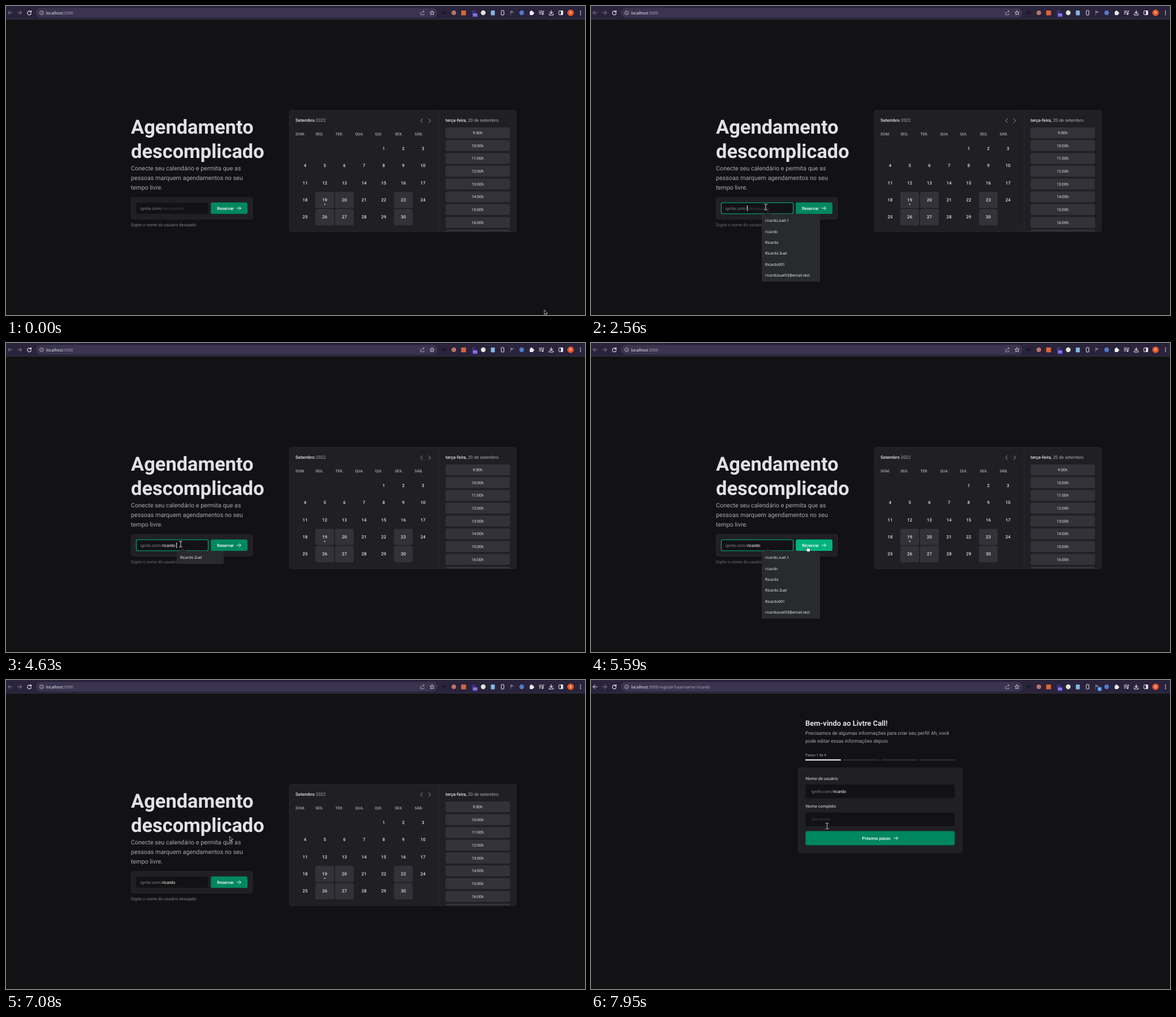
An HTML page for the animation above (8 s loop, 1024 by 547 pixels).

```html
<!DOCTYPE html>
<html lang="pt-BR">
<head>
<meta charset="utf-8">
<title>Agendamento</title>
<style>
html, body { margin: 0; width: 100%; height: 100%; overflow: hidden; background: #121214; }
svg { display: block; width: 1024px; height: 547px; }
text { font-family: Roboto, sans-serif; white-space: pre; text-rendering: geometricPrecision; }
.ui { font-family: "Open Sans", sans-serif; }
.line { fill: none; stroke-linecap: round; stroke-linejoin: round; }
</style>
</head>
<body>
<svg id="stage" viewBox="0 0 1024 547" xmlns="http://www.w3.org/2000/svg"></svg>
<script>
const LOOP = 8000, NAV = 7400;
const USER = 'ricardo';
const NAMES = ['ricardo.zuel.1', USER, 'Ricardo', 'Ricardo Zuel', 'Ricardo001', 'ricardozuel53@email.test'];
const C = { bg: '#121214', card: '#202024', edge: '#323238', dim: '#7c7c8a', soft: '#a9a9b2',
  text: '#e1e1e6', white: '#fff', green: '#00875f', bright: '#00b37e', hint: '#404049' };
const SIZE = { xs: 6.45, sm: 7.525, md: 8.6, xl: 10.75, h2: 12.9, h1: 34.4 };

const rect = (x, y, w, h, fill, r = 0, extra = '') =>
  `<rect x="${x}" y="${y}" width="${w}" height="${h}" rx="${r}" fill="${fill}" ${extra}/>`;
const text = (x, y, size, fill, str, extra = '') =>
  `<text x="${x}" y="${y}" font-size="${size}" fill="${fill}" ${extra}>${str}</text>`;
const line = (d, color, w = 1, extra = '') =>
  `<path class="line" d="${d}" stroke="${color}" stroke-width="${w}" ${extra}/>`;
const dot = (x, y, r, fill) => `<circle cx="${x}" cy="${y}" r="${r}" fill="${fill}"/>`;
const group = (id, body) => `<g id="${id}">${body}</g>`;
const card = (x, y, w, h) => rect(x, y, w, h, C.card, 3.5, `stroke="${C.edge}" stroke-width=".6"`);
const arrow = (x, y) => line(`M${x} ${y}h7M${x + 4.2} ${y - 2.9}l2.9 2.9l-2.9 2.9`, C.white, .9);
const MED = 'font-weight="500"', BOLD = 'font-weight="700"', MID = 'text-anchor="middle"';

function toolbar() {
  const w = '#f0eef6', g = '#8b869d';
  return rect(0, 0, 1024, 23, '#29233b') + rect(131, 0, 893, .6, '#191527') + rect(0, 23, 1024, .6, '#4a4459') +
    rect(53, 3.5, 710, 17, '#3a3450', 8.5) +
    line('M10.8 12H3.8M7 8.6L3.6 12L7 15.4', g, 1, 'id="back"') +
    line('M20.5 12h7M24.3 8.6l3.4 3.4l-3.4 3.4', g) +
    line('M43.9 10.2A3.4 3.4 0 1 0 44.6 12.8M44.6 8.2v2.6h-2.6', w, 1.1) +
    line('M66.4 12a3.4 3.4 0 1 1 -6.8 0a3.4 3.4 0 1 1 6.8 0M63 11.8v1.8M63 10.2v.1', '#cbc7d8', .8) +
    `<text id="url" class="ui" x="71" y="14.5" font-size="7.1" fill="${C.white}">localhost<tspan fill="#b3aec3"></tspan></text>` +
    line('M733 11.2v4.4h6.2v-2.2M735 13c.2-2.6 1.8-3.6 4.6-3.6M737.8 7.8l2 1.6l-2 1.7', '#b5b0c4', .8) +
    line('M753.5 8.3l1.1 2.5l2.7 .3l-2 1.8l.6 2.7l-2.4-1.4l-2.4 1.4l.6-2.7l-2-1.8l2.7-.3z', w, .8) +
    rect(770.5, 9.5, 7, 4.5, '#1d182c', 1) +
    dot(792, 12, 4, '#b7746a') +
    rect(805, 8, 8.5, 8.5, '#d8643c') +
    dot(827, 10.5, 3.6, '#3c2d70') + rect(825, 12.6, 9, 6.8, '#5b46c8', 1) +
    text(829.5, 18, 5.6, C.white, '11', MID + ' ' + BOLD) +
    dot(844, 12, 4.2, '#dfe5d8') +
    rect(857.5, 8, 7, 8.5, '#82b8e6', 1) +
    rect(876, 8, 4.6, 8, 'none', .8, `stroke="${w}" stroke-width="1"`) +
    `<path d="M892 8l7 2.4l-6.2 2.4v3.6h-.8z" fill="#77738a"/>` +
    group('badge', rect(896, 12.6, 7, 6.8, '#4c8fe0', 1) + text(899.5, 18, 5.6, C.white, '1', MID + ' ' + BOLD)) +
    dot(912, 12, 4.2, '#5079c8') +
    rect(926.3, 9.6, 6.2, 6.3, w, .8) + dot(929.3, 9.3, 1.4, w) + dot(932.8, 12.6, 1.4, w) +
    line('M943 9h5.5M943 11.5h5.5M943 14h3M950 14V9h1.6', w) + dot(949, 14.4, 1.3, w) +
    line('M964.3 8v5M961.8 10.8l2.5 2.5l2.5-2.5M960.8 13.8v2.2h7v-2.2', w, 1.1) +
    rect(977.8, 8.5, 7, 7, 'none', .8, `stroke="${w}" stroke-width="1"`) + rect(981.5, 8.5, 3.3, 7, w) +
    dot(998.5, 12, 5.8, '#e5562b') + text(998.5, 14.3, 6.2, C.white, 'R', MID) +
    dot(1016, 8.8, .9, w) + dot(1016, 12, .9, w) + dot(1016, 15.2, .9, w);
}

function calendar() {
  const col = i => 529 + i * 34.75, row = i => 251.8 + i * 30.45;
  const open = [19, 20, 23, 26, 27, 30];
  let s = card(501, 184.8, 401.5, 214.7) + line('M766 185v214', C.edge, .6);
  s += text(512, 205.4, 7.8, C.text, `Setembro <tspan font-weight="400" fill="${C.soft}">2022</tspan>`, MED);
  s += line('M736.6 199.6l-3.4 3.3l3.4 3.3M747.6 199.6l3.4 3.3l-3.4 3.3', C.soft, .9);
  ['DOM.', 'SEG.', 'TER.', 'QUA.', 'QUI.', 'SEX.', 'SÁB.'].forEach((d, i) => {
    s += text(512.2 + i * 35.1, 229, 6.7, C.soft, d, MED);
  });
  for (let d = 1; d <= 30; d++) {
    const x = col((d + 3) % 7), y = row(Math.floor((d + 3) / 7));
    if (open.includes(d)) s += rect(x - 16.6, y - 14.2, 33, 28.8, C.edge, 3);
    s += text(x, y + 2.8, 7.75, C.text, d, MED + ' ' + MID);
  }
  s += dot(col(1), 351, 1.1, C.text);
  s += text(777.3, 205.4, 7.8, C.text, `terça-feira, <tspan font-weight="400" fill="${C.soft}">20 de setembro</tspan>`, MED);
  for (let i = 0; i < 8; i++) {
    const y = 224.5 + i * 22.65;
    s += rect(777.3, y - 9.6, 114, 19.2, C.edge, 3) + text(834.2, y + 2.5, 6.95, C.text, `${9 + i}:00h`, MID);
  }
  return s + `<path d="M777.3 399V398.6a3 3 0 0 1 3-2.6h108a3 3 0 0 1 3 2.6V399z" fill="${C.edge}"/>`;
}

function home() {
  let s = text(221, 226.1, SIZE.h1, C.text, 'Agendamento', BOLD) + text(221, 269.1, SIZE.h1, C.text, 'descomplicado', BOLD);
  ['Conecte seu calendário e permita que as', 'pessoas marquem agendamentos no seu', 'tempo livre.']
    .forEach((str, i) => s += text(221, 290.8 + i * 17.2, SIZE.xl, C.soft, str));
  s += card(221.3, 338.9, 214.8, 38.3);
  s += rect(230.4, 348.2, 127.2, 19.6, C.bg, 2.6, 'id="field" stroke-width="1.1"');
  s += text(237.7, 360.6, SIZE.sm, C.dim, 'ignite.com/');
  s += text(276, 360.6, SIZE.sm, C.hint, 'seu-usuário', 'id="hint"') + text(276, 360.6, SIZE.sm, C.white, '', 'id="typed"');
  s += rect(276, 353, .9, 10, C.white, 0, 'id="caret"');
  s += rect(362.3, 347.8, 64.7, 20.3, C.green, 2.6, 'id="button"');
  s += text(373.2, 360.7, SIZE.sm, C.white, 'Reservar', MED) + arrow(408.3, 358);
  s += text(221, 389.7, SIZE.sm, C.dim, 'Digite o nome do usuário desejado', 'id="help"');
  s += calendar();
  const menu = (id, names, w, h) => group(id, rect(302, 368, w, h, '#292a2d', 1.5) +
    `<path d="M307.5 368.2l5.2-4.6l5.2 4.6z" fill="#292a2d"/>` +
    names.map((n, i) => text(308, 382.3 + i * 19.35, 6.7, C.white, n, 'class="ui"')).join(''));
  return s + menu('full', NAMES, 103, 120) + menu('single', [NAMES[3]], 83, 23);
}

function register() {
  let s = text(379, 81.2, SIZE.h2, C.text, 'Bem-vindo ao Livtre Call!', BOLD);
  s += text(379, 97, SIZE.md, C.soft, 'Precisamos de algumas informações para criar seu perfil! Ah, você');
  s += text(379, 110.8, SIZE.md, C.soft, 'pode editar essas informações depois.');
  s += text(379, 135.3, SIZE.xs, C.soft, 'Passo 1 de 4');
  for (let i = 0; i < 4; i++) s += rect(379 + i * 67.2, 140.5, 63, 2.1, i ? C.edge : C.white, .5);
  s += card(366.5, 155.8, 290, 149.7);
  s += text(379.7, 177, SIZE.sm, C.text, 'Nome de usuário') + rect(379.5, 185, 263.7, 24.5, C.bg, 3);
  s += text(389.5, 199.8, SIZE.sm, C.dim, `ignite.com/<tspan fill="${C.white}">${USER}</tspan>`);
  s += text(379.7, 226.2, SIZE.sm, C.text, 'Nome completo') + rect(379.5, 234.5, 263.7, 24.5, C.bg, 3);
  s += text(389.5, 249.2, SIZE.sm, C.hint, 'Seu nome');
  s += rect(379.5, 267.5, 263.7, 25, C.green, 3) + text(479.6, 282.5, SIZE.sm, C.white, 'Próximo passo', MED);
  return s + arrow(535.6, 280);
}

function pointers() {
  const beam = 'M-2.6-5h1.6q1 0 1 1v8q0 1-1 1h-1.6M2.6-5h-1.6q-1 0-1 1M2.6 5h-1.6q-1 0-1-1';
  return group('mouse',
    group('arrow', `<path d="M0 0V8.1L1.9 6.4L3.2 9.3L4.4 8.8L3.2 6H5.7z" fill="#0c0c0e" stroke="#e8e8e8" stroke-width=".7"/>`) +
    group('beam', line(beam, '#0c0c0e', 2) + line(beam, '#d8d8d8', 1)) +
    group('hand', `<path d="M-.9 .6a.9 .9 0 0 1 1.8 0V4.2l3.2 .8q1 .3 .9 1.4l-.6 2.6q-.2 1.4-1.4 1.4H0q-.8 0-1.3-.8L-3.3 6.6q-.4-1 .6-1.1l1.8 1.1z" fill="#fff" stroke="#0c0c0e" stroke-width=".6"/>`));
}

const stage = document.getElementById('stage');
stage.innerHTML = toolbar() + group('home', home()) + group('register', register()) + pointers();
const el = {};
stage.querySelectorAll('[id]').forEach(n => el[n.id] = n);

// time, x, y, pointer shape from then on
const path = [
  [0, 952, 538, 'arrow'], [200, 800, 500, 'arrow'], [330, 610, 452, 'arrow'], [460, 488, 427, 'arrow'],
  [535, 488, 427, 'arrow'], [600, 494, 434, 'arrow'], [800, 420, 392, 'arrow'], [1000, 290, 338, 'arrow'],
  [1070, 280, 334, 'arrow'], [1200, 292, 349, 'beam'], [1330, 309, 356, 'beam'],
  [5170, 309, 356, 'beam'], [5330, 350, 362, 'beam'], [5400, 364, 362, 'hand'], [5530, 383, 359, 'hand'],
  [5930, 383, 360, 'hand'], [6060, 378, 347, 'arrow'], [6260, 364, 305, 'arrow'], [6460, 372, 250, 'arrow'],
  [6560, 384, 243, 'arrow'], [6720, 394, 262, 'arrow'], [6760, 394, 262, 'arrow'], [7000, 395.5, 276.5, 'arrow'],
  [7200, 395.5, 276.5, 'arrow'], [7420, 399, 236, 'arrow'], [7600, 403, 212, 'arrow'],
  [7650, 403, 212, 'arrow'], [7730, 407, 224, 'beam'], [7930, 417.5, 258.5, 'beam'], [LOOP, 417.5, 258.5, 'beam']
];

// time, typed text, menu, caret, focus
const steps = [
  [0, '', '', 0, 0], [1490, '', '', 1, 1], [1560, '', 'full', 1, 1], [2030, '', 'full', 0, 1], [2560, '', 'full', 1, 1],
  [2890, 'dr', 'full', 1, 1], [2960, 'dri', '', 1, 1], [3220, 'dr', '', 1, 1], [3490, 'd', '', 0, 1],
  [3750, '', '', 0, 1], [4020, '', '', 1, 1],
  ...[...USER].map((_, i) => [4160 + i * 67, USER.slice(0, i + 1), 'full', 1, 1]),
  [4630, USER + ' ', 'single', 1, 1], [4790, USER, 'full', 1, 1], [5170, USER, 'full', 0, 1], [5660, USER, '', 0, 0]
];

const show = (node, on) => node.setAttribute('visibility', on ? 'visible' : 'hidden');
const at = (table, t) => table.findLastIndex(row => row[0] <= t);

function moveMouse(t) {
  const tick = 200 / 3, q = Math.floor((t + 8) / tick) * tick;
  const i = Math.min(at(path, q), path.length - 2);
  const [t0, x0, y0, shape] = path[i], [t1, x1, y1] = path[i + 1];
  const k = (q - t0) / (t1 - t0);
  el.mouse.setAttribute('transform', `translate(${x0 + (x1 - x0) * k} ${y0 + (y1 - y0) * k})`);
  for (const s of ['arrow', 'beam', 'hand']) show(el[s], s === shape);
  el.button.setAttribute('fill', shape === 'hand' ? C.bright : C.green);
}

function render(t) {
  const [, typed, menu, caret, focus] = steps[at(steps, t)], moved = t >= NAV;
  el.home.style.display = moved ? 'none' : '';
  el.register.style.display = moved ? '' : 'none';
  el.url.lastChild.textContent = ':3000' + (moved ? '/register?username=' + USER : '');
  el.back.setAttribute('stroke', moved ? '#f0eef6' : '#8b869d');
  show(el.badge, moved);
  moveMouse(t);
  if (moved) return;
  el.typed.textContent = typed;
  show(el.hint, !typed);
  show(el.caret, caret);
  el.caret.setAttribute('x', 276 + (typed ? el.typed.getComputedTextLength() : 0));
  el.field.setAttribute('stroke', focus ? C.bright : 'none');
  el.help.setAttribute('fill', focus ? '#6c6c70' : C.dim);
  show(el.full, menu === 'full');
  show(el.single, menu === 'single');
}

function frame() {
  render(performance.now() % LOOP);
  requestAnimationFrame(frame);
}
frame();
</script>
</body>
</html>
```
